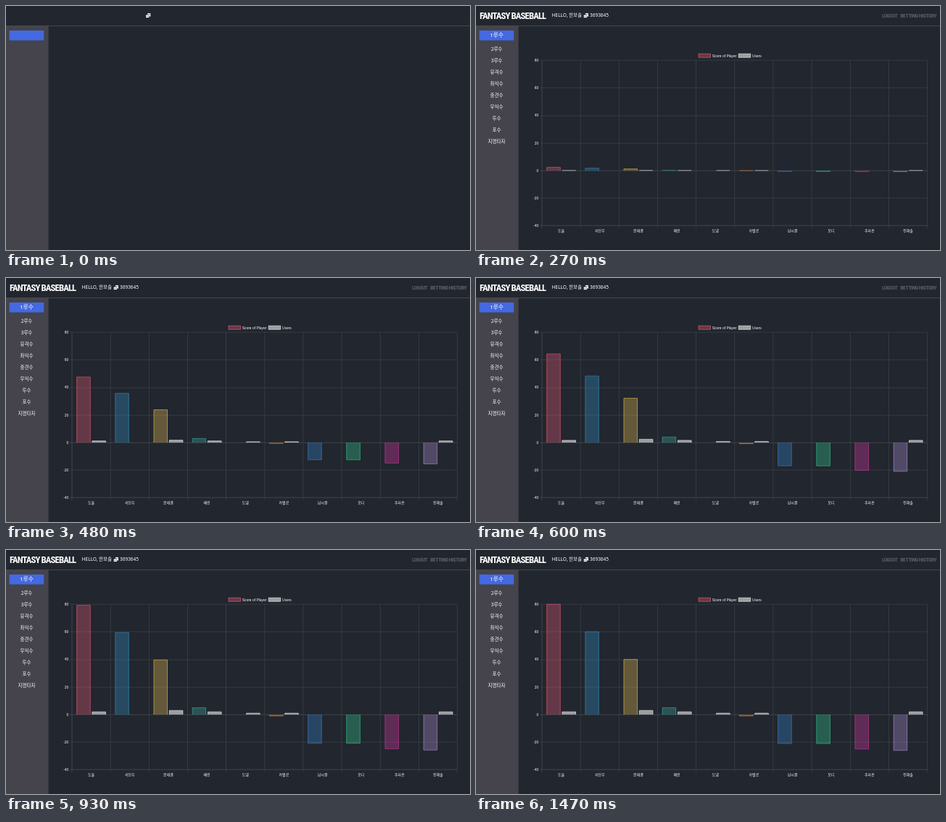
Animation of 640x338 px, one loop 1800 ms. Source, as an HTML page with a canvas:

```html
<!DOCTYPE html>
<html lang="ko">
<head>
<meta charset="utf-8">
<title>Fantasy Baseball</title>
<style>
  html, body { margin: 0; width: 100%; height: 100%; overflow: hidden; background: #22262e; }
  canvas { display: block; width: 640px; height: 338px; }
</style>
</head>
<body>
<canvas id="stage" width="640" height="338"></canvas>
<script>
const ctx = document.getElementById('stage').getContext('2d');
const LOOP = 1800, STEP = 30, LOADING_AT = 30, CHART_AT = 270;
const UI_FONT = '"Noto Sans", "Noto Sans CJK KR", sans-serif';
const CHART_FONT = '"Liberation Sans", "Noto Sans CJK KR", sans-serif';
const DISPLAY_FONT = '"Roboto Condensed", Roboto, sans-serif';

const positions = ['1루수', '2루수', '3루수', '유격수', '좌익수', '중견수', '우익수', '투수', '포수', '지명타자'];
const players = [
  { name: '도율', score: 80, users: 2, rgb: '235,92,122' },
  { name: '서단우', score: 60, users: 0, rgb: '50,145,200' },
  { name: '문태결', score: 40, users: 3, rgb: '232,190,82' },
  { name: '베린', score: 5, users: 2, rgb: '60,175,165' },
  { name: '도넬', score: 0, users: 1, rgb: '150,110,220' },
  { name: '카벨로', score: -1, users: 1, rgb: '245,150,64' },
  { name: '남시결', score: -21, users: 0, rgb: '54,135,210' },
  { name: '모디', score: -21, users: 0, rgb: '50,205,145' },
  { name: '추라온', score: -25, users: 0, rgb: '215,55,165' },
  { name: '민해솔', score: -26, users: 2, rgb: '175,145,215' }
];

// Time and linear progress of the bar growth.
const growth = [[270, 0.0076], [480, 0.202], [720, 0.4665], [930, 0.692], [1220, 1]];

const plot = { left: 91, right: 622.6, top: 75.1, bottom: 304.4, max: 80, min: -40 };
const yOf = v => plot.top + (plot.max - v) / (plot.max - plot.min) * (plot.bottom - plot.top);

function rect(x, y, w, h, color) {
  ctx.fillStyle = color;
  ctx.fillRect(x, y, w, h);
}

function text(str, x, y, size, { align = 'left', color = '#fff', font = UI_FONT } = {}) {
  ctx.font = `${size}px ${font}`;
  ctx.textAlign = align;
  ctx.fillStyle = color;
  ctx.fillText(str, x, y + size * 0.36);
}

// Condensed caps at the largest size that leaves room for their neighbours.
function heading(str, x, y, maxSize, room, color) {
  let size = maxSize + 0.25;
  do {
    size -= 0.25;
    ctx.font = `bold condensed ${size}px ${DISPLAY_FONT}`;
    ctx.letterSpacing = `${-0.07 * size}px`;
  } while (size > 6 && ctx.measureText(str).width > room);
  ctx.textAlign = 'left';
  ctx.fillStyle = color;
  ctx.fillText(str, x, y + size * 0.356);
  ctx.letterSpacing = '0px';
}

function coins(x, y) {
  rect(x + 2.2, y, 4.1, 4.6, '#fff');
  rect(x + 2.2, y + 1.5, 4.1, 0.4, '#22262e');
  rect(x - 0.3, y + 2.1, 4.8, 4.4, '#22262e');
  rect(x, y + 2.5, 4.2, 3.6, '#fff');
  rect(x, y + 4.2, 4.2, 0.4, '#22262e');
}

function header(ready) {
  rect(0, 27, 640, 1, '#44474e');
  coins(ready ? 148.7 : 193, 10);
  if (!ready) return;
  heading('FANTASY BASEBALL', 5, 13, 16.5, 93, '#fff');
  text('HELLO, 한보솔', 104.7, 13, 6.5);
  text('3693645', 157, 13, 6.5);
  heading('LOGOUT', 560, 13, 11.5, 22, '#5b5e65');
  heading('BETTING HISTORY', 585.3, 13, 11.5, 50, '#5b5e65');
}

function sidebar(width, ready) {
  rect(0, 28, width, 310, '#45444c');
  rect(4.6, 34, width - 11, 13.6, '#4469e0');
  if (!ready) return;
  positions.forEach((label, i) => {
    text(label, width / 2 - 0.8, i ? 44 + 16 * i : 40.4, i ? 6.5 : 7.8, { align: 'center' });
  });
}

function loader(time) {
  for (let i = 0; i < 9; i++) {
    const age = Math.max(0, time - 60 - 100 * i);
    const h = 16 + 4 * Math.sin(Math.min(1, age / 120) * Math.PI * 0.75);
    rect(321.4 + 4.45 * i, 183 - h / 2, 2.1, h, '#fff');
  }
  text('Loading...', 339.8, 215.3, 6.6, { align: 'center' });
}

function growthAt(time) {
  const next = growth.findIndex(p => p[0] > time);
  if (next < 0) return 1;
  const [t0, p0] = growth[next - 1], [t1, p1] = growth[next];
  const p = p0 + (p1 - p0) * (time - t0) / (t1 - t0);
  return 1 - (1 - p) ** 4;
}

function bar(x, w, value, fill, border) {
  if (!value) return;
  const base = yOf(0), tip = yOf(value), inset = 0.3;
  rect(x, Math.min(base, tip), w, Math.abs(base - tip), fill);
  ctx.strokeStyle = border;
  ctx.lineWidth = 0.7;
  ctx.beginPath();
  ctx.moveTo(x + inset, base);
  ctx.lineTo(x + inset, tip);
  ctx.lineTo(x + w - inset, tip);
  ctx.lineTo(x + w - inset, base);
  ctx.stroke();
}

function legend(x, label, fill, border) {
  rect(x, 66.2, 16.5, 5, fill);
  ctx.strokeStyle = border;
  ctx.lineWidth = 0.8;
  ctx.strokeRect(x, 66.2, 16.5, 5);
  text(label, x + 18.7, 68.8, 4.95, { font: CHART_FONT });
}

function chart(time) {
  const gridColor = '#3b3f46', userFill = '#9b9da1', userBorder = '#d2d3d6';
  const step = (plot.right - plot.left) / players.length;
  const slot = step * 0.4, barWidth = slot * 0.9;

  legend(307, 'Score of Player', 'rgba(235,92,122,.35)', 'rgba(235,92,122,.8)');
  legend(362.2, 'Users', userFill, userBorder);

  for (let v = plot.max; v >= plot.min; v -= 20) {
    const edge = v === 0 || v === plot.min;
    rect(87.5, Math.round(yOf(v)) - 0.3, plot.right - 87.5, 0.8, edge ? '#484c53' : gridColor);
    text(String(v), 86.3, yOf(v), 4.95, { align: 'right', font: CHART_FONT });
  }
  for (let i = 0; i <= players.length; i++) {
    rect(plot.left + i * step - 0.4, plot.top, 0.8, plot.bottom - plot.top + 3.5, i ? gridColor : '#484c53');
  }

  const k = growthAt(time);
  players.forEach(({ name, score, users, rgb }, i) => {
    const x = plot.left + i * step + step * 0.1 + slot * 0.05;
    bar(x, barWidth, score * k, `rgba(${rgb},.33)`, `rgba(${rgb},.8)`);
    bar(x + slot, barWidth, users * k, userFill, userBorder);
    text(name, plot.left + (i + 0.5) * step, 311.4, 4.95, { align: 'center', font: CHART_FONT });
  });
}

function draw(time) {
  const ready = time >= LOADING_AT;
  const loading = ready && time < CHART_AT;
  rect(0, 0, 640, 338, '#22262e');
  if (loading) rect(0, 28, 640, 310, '#1a1e26');
  header(ready);
  sidebar(loading ? 54.6 : 58.6, ready);
  if (loading) loader(time);
  else if (ready) chart(time);
}

const start = performance.now();
function tick() {
  const time = (performance.now() - start) % LOOP;
  draw(Math.floor(time / STEP) * STEP);
  requestAnimationFrame(tick);
}
tick();
</script>
</body>
</html>
```
